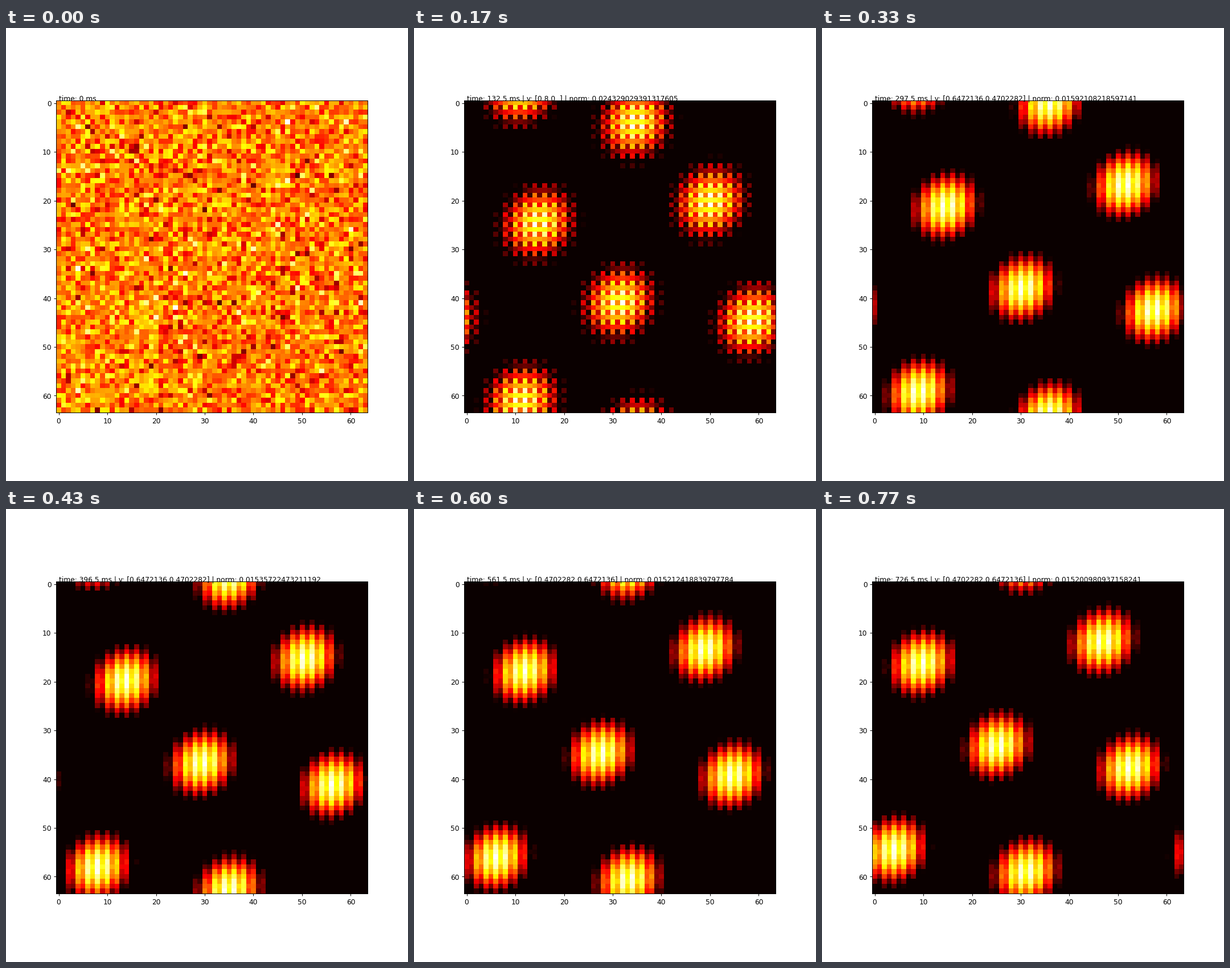
Animation of 706x794 px, one loop 0.81 s. Source, as a matplotlib script:

```python
import numpy as np
import matplotlib.pyplot as plt
from matplotlib.animation import FuncAnimation

N = 64
TICK, LOOP = 10, 810            # ms of playback
STEPS, STEP = 24, 33            # pictures per loop, simulated ms between them
FORMED = 66.5                   # simulated ms when the first bumps stand out
STAGE = 250                     # simulated ms for which each heading holds
SPEED = 0.8
DRIFT = 0.0203                  # cells per ms per unit of velocity

HEADINGS = np.pi * np.array([0, 0.2, 0.3])
VELOCITIES = SPEED * np.column_stack([np.cos(HEADINGS), np.sin(HEADINGS)])

# Bumps settle on two diagonal chains that close on the torus
CHAIN_STARTS = np.array([[9.4, 60], [36.4, 64.5]])
LINKS = np.arange(3)[:, None] * np.array([N / 3, -N / 3])
SETTLED = (CHAIN_STARTS[:, None] + LINKS).reshape(-1, 2)
# Where the same bumps first appear, before they spread out
FORMING = np.array([[14, 58], [32, 39.5], [47, 20],
                    [32, 68.5], [60, 42], [78, 24]])

rows, cols = np.mgrid[:N, :N]
noise = np.random.default_rng(11).normal(0.55, 0.13, (N, N)).clip(0, 1)


def velocity(t):
    return VELOCITIES[int(t // STAGE)]


def direction_bias(v):
    """Each 2x2 tile holds four cells that prefer opposite directions."""
    sign = 1 - 2 * (cols % 2)
    return sign * np.where(rows % 2, v[0], v[1])


def drift(t):
    """Pattern displacement (x, y), zero at the first change of heading."""
    held = np.clip(t - STAGE * np.arange(3), 0, STAGE)
    held[0] -= STAGE
    return -DRIFT * (held @ VELOCITIES)[::-1]


def centres(t):
    spread = min(np.exp((FORMED - t) / 75), 1)
    return SETTLED + spread * (FORMING - SETTLED) + drift(t)


def square_dist(points, shear=0.0):
    """Squared distance on the torus from every cell to each point."""
    def wrap(d):
        return (d + N / 2) % N - N / 2
    dx = wrap(cols - points[:, 0, None, None])
    dy = wrap(rows - points[:, 1, None, None])
    return dx**2 + dy**2 + 2 * shear * dx * dy


def activity(t):
    if t == 0:
        return noise
    bias = direction_bias(velocity(t))
    if t < 1:
        return np.maximum(noise + 0.1 * bias, 0)

    spots = centres(t)
    contrast = min(t / FORMED, 1) ** 1.5
    swell = np.exp(-square_dist(spots) / 98).sum(axis=0)
    early = 0.45 - contrast * (0.43 - 0.55 * swell) + 0.54 * bias

    r = np.sqrt(square_dist(spots, 0.12).min(axis=0))
    late = 0.88 * np.cos(np.pi * np.minimum(r / 14.8, 1)) + 0.19 * bias

    grown = np.clip((t - FORMED) / 100, 0, 1) ** 0.7
    return np.maximum((1 - grown) * early + grown * late, 0)


def caption(t):
    if t == 0:
        return "time: 0 ms"
    norm = float(0.0152 + 0.0252 * np.exp((FORMED - t) / 65))
    return f"time: {t} ms | v: {velocity(t)} | norm: {norm}"


fig, ax = plt.subplots(figsize=(8, 9), dpi=88.25)
image = ax.imshow(noise, cmap="hot")
label = ax.text(0, -0.5, caption(0))


def update(tick):
    step = min(int((tick * TICK + 5) * 3 / 100), STEPS - 1)
    t = 0 if step == 0 else 0.5 + STEP * (step - 1)
    field = activity(t)
    image.set_data(field)
    image.set_clim(0, field.max())
    label.set_text(caption(t))
    return image, label


anim = FuncAnimation(fig, update, frames=LOOP // TICK, interval=TICK,
                     repeat=True, repeat_delay=0, cache_frame_data=False)
plt.show()
```
